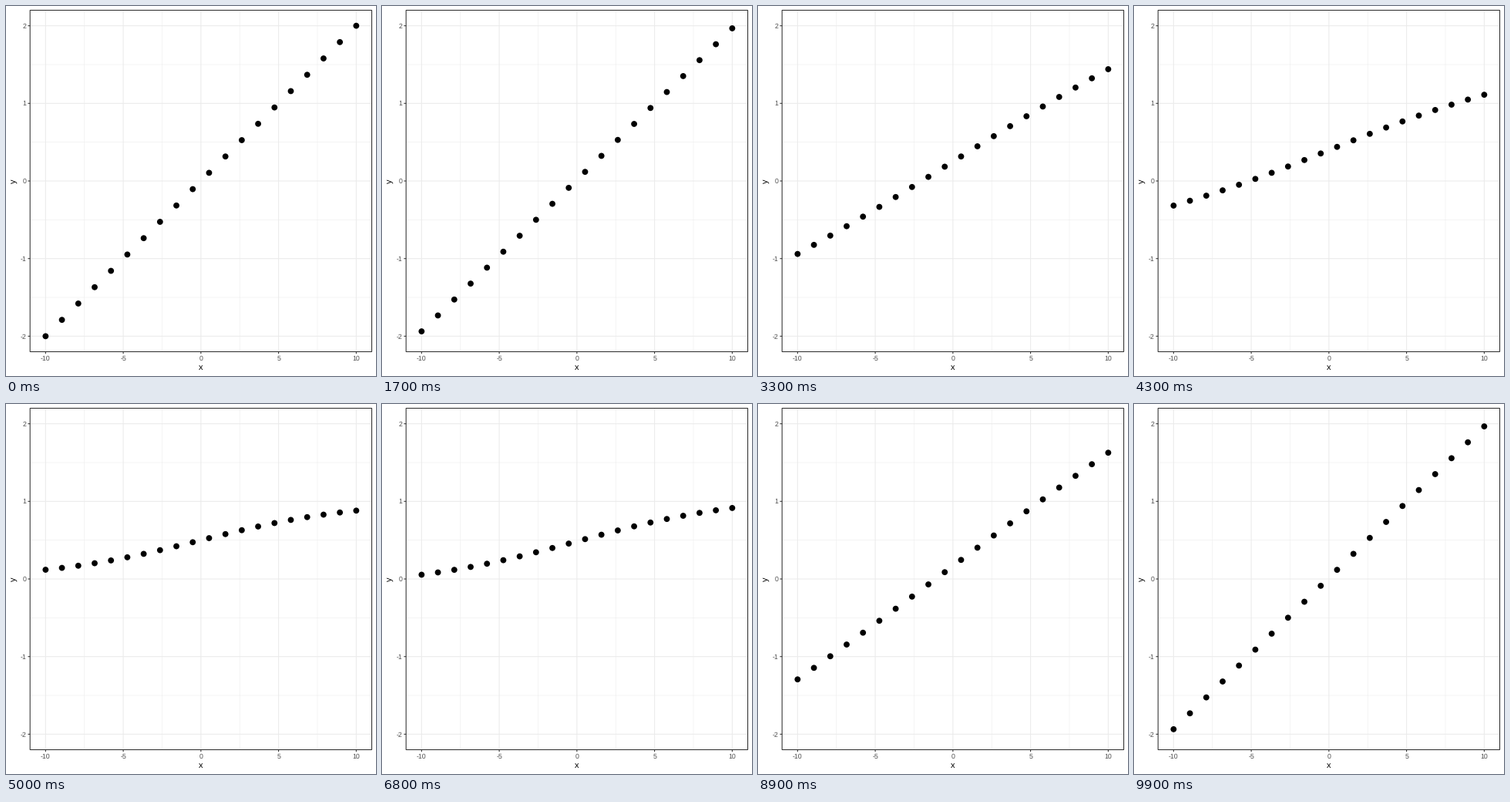
These frames come from a looping animation (480x480 px, 10000 ms). A matplotlib script:

```python
import matplotlib.pyplot as plt
import numpy as np
from matplotlib.animation import FuncAnimation
from matplotlib.patches import Circle, Rectangle

SIZE, DPI = 480, 72  # at 72 dpi one point is one pixel
LEFT, RIGHT, TOP, BOTTOM = 31.2, 474.5, 5.5, 448.5
GRID, DARK, LABEL = "#ebebeb", "#333333", "#4d4d4d"
LINE = 1.07
TICK = 2.75

plt.rcParams.update({
    "font.family": "Liberation Sans",
    "text.hinting": "none",
    "axes.unicode_minus": False,
})

fig = plt.figure(figsize=(SIZE / DPI, SIZE / DPI), dpi=DPI, facecolor="white")
ax = fig.add_axes([0, 0, 1, 1])
ax.set(xlim=(0, SIZE), ylim=(SIZE, 0))
ax.axis("off")


def px(x):
    return LEFT + (x + 11) / 22 * (RIGHT - LEFT)


def py(y):
    return BOTTOM - (y + 2.2) / 4.4 * (BOTTOM - TOP)


def line(x0, y0, x1, y1, color, width, z):
    ax.plot([x0, x1], [y0, y1], color=color, lw=width, zorder=z,
            solid_capstyle="butt", snap=False)


def grid(xs, ys, width):
    for x in xs:
        line(px(x), TOP, px(x), BOTTOM, GRID, width, 1)
    for y in ys:
        line(LEFT, py(y), RIGHT, py(y), GRID, width, 1)


x_ticks, y_ticks = range(-10, 11, 5), range(-2, 3)
grid(np.arange(-7.5, 8, 5), np.arange(-1.5, 2), LINE / 2)
grid(x_ticks, y_ticks, LINE)

for x in x_ticks:
    line(px(x), BOTTOM, px(x), BOTTOM + TICK, DARK, LINE, 4)
    ax.text(px(x), 459.9, str(x), size=8.8, color=LABEL, ha="center", va="baseline")
for y in y_ticks:
    line(LEFT - TICK, py(y), LEFT, py(y), DARK, LINE, 4)
    ax.text(26.3, py(y) + 3.15, str(y), size=8.8, color=LABEL, ha="right", va="baseline")

ax.add_patch(Rectangle((LEFT, TOP), RIGHT - LEFT, BOTTOM - TOP, fill=False,
                       ec=DARK, lw=LINE, zorder=4, snap=False))
ax.text(px(0), 472.3, "x", size=11, color="black", ha="center", va="baseline")
ax.text(13.4, py(0), "y", size=11, color="black", rotation=90,
        ha="right", va="center", rotation_mode="default").set(
            ha="center", va="baseline", rotation_mode="anchor")

xs = np.linspace(-10, 10, 20)
straight = 0.2 * xs
sigmoid = 1 / (1 + np.exp(-straight))
dots = [ax.add_patch(Circle((px(x), py(y)), 3.9, fc="black", lw=0, zorder=3))
        for x, y in zip(xs, straight)]


def blend(frame):
    """Share of the sigmoid: hold, bend, hold, straighten."""
    return np.interp(frame, [16, 50, 67, 100], [0, 1, 1, 0])


def update(frame):
    ys = straight + blend(frame) * (sigmoid - straight)
    for dot, x, y in zip(dots, xs, ys):
        dot.center = px(x), py(y)
    return dots


anim = FuncAnimation(fig, update, frames=100, interval=100, repeat=True, repeat_delay=0)
plt.show()
```
